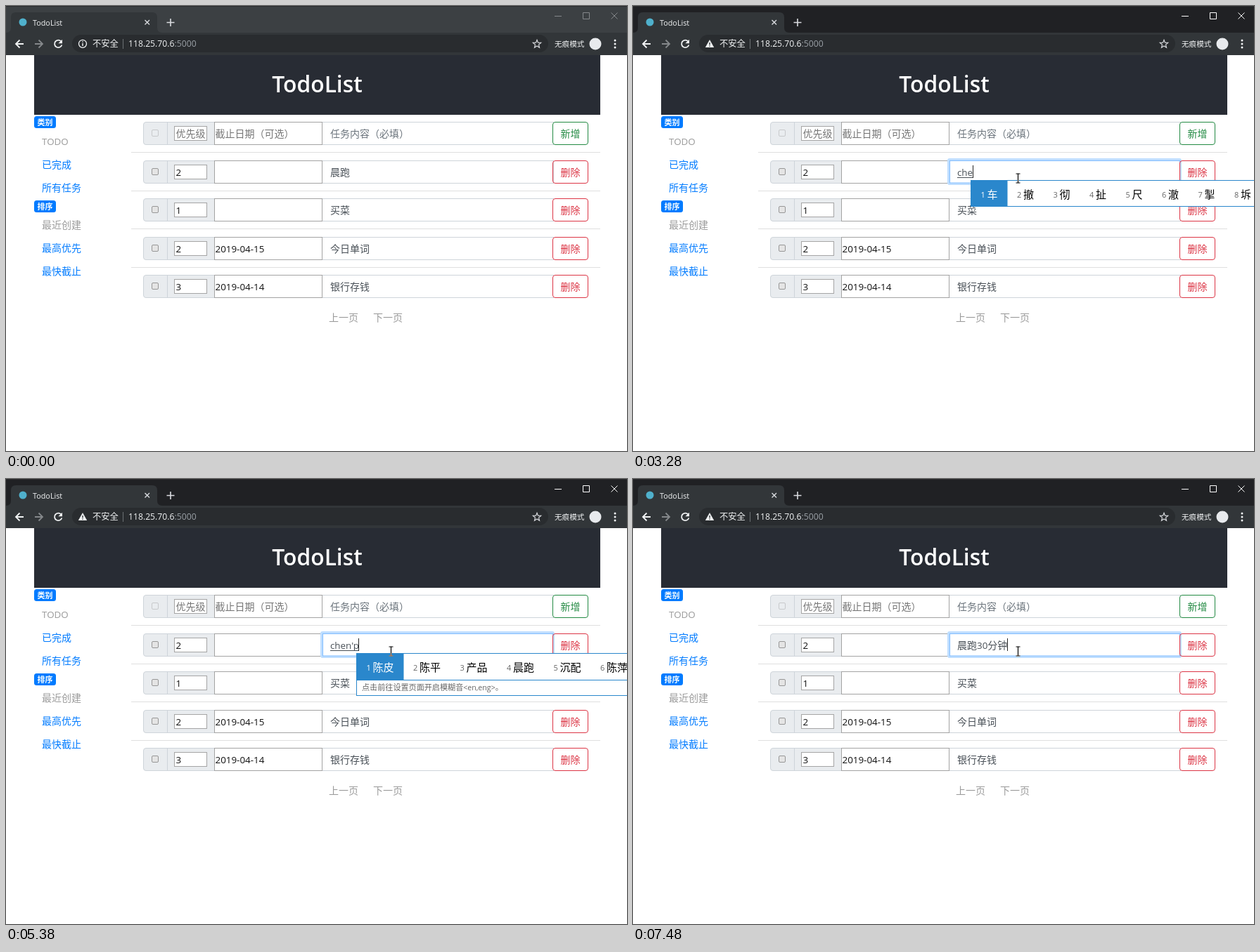
Animation of 883 by 634 pixels, one loop 8 s. Source, as an HTML page:

```html
<!DOCTYPE html>
<html lang="zh-CN">
<head>
<meta charset="utf-8">
<title>TodoList</title>
<style>
html, body { margin: 0; width: 100%; height: 100%; overflow: hidden; background: #fff; }
svg { display: block; width: 883px; height: 634px; isolation: isolate; }
text { font-family: "Open Sans", "Noto Sans CJK SC", "Noto Sans CJK", sans-serif; white-space: pre; }
#beam { mix-blend-mode: difference; }
</style>
</head>
<body>
<svg id="stage" viewBox="0 0 883 634"></svg>
<script>
const LOOP = 8000, CLICK = 780, WARN = 1940;
const BLUE = '#007bff', RED = '#dc3545', GREEN = '#238a43', MUTED = '#9b9b9b';
const IME_BLUE = '#2a87cc', INPUT_X = 461, INPUT_Y = 241.5;

const esc = s => s.replace(/&/g, '&amp;').replace(/</g, '&lt;').replace(/>/g, '&gt;');
// Latin runs are set slightly smaller than the Chinese text around them
const runs = (s, size) => s.replace(/[!-~]+/g,
  m => `<tspan font-size="${size * 0.957}">${esc(m)}</tspan>`);
const text = (x, y, s, fill, size = 14, more = '') =>
  `<text x="${x}" y="${y}" font-size="${size}" fill="${fill}" ${more}>${runs(s, size)}</text>`;
const rect = (x, y, w, h, fill, more = '') =>
  `<rect x="${x}" y="${y}" width="${w}" height="${h}" fill="${fill}" ${more}/>`;
const box = (x, y, w, h, stroke, fill = '#fff', rx = 0) =>
  rect(x + .5, y + .5, w - 1, h - 1, fill, `stroke="${stroke}" rx="${rx}"`);
const path = (d, stroke, width = 1, more = 'fill="none"') =>
  `<path d="${d}" stroke="${stroke}" stroke-width="${width}" ${more}/>`;
const dot = (x, y, r, fill, more = '') => `<circle cx="${x}" cy="${y}" r="${r}" fill="${fill}" ${more}/>`;

function browser() {
  const star = Array.from({ length: 10 }, (_, i) => {
    const r = i % 2 ? 2.6 : 6, a = i * Math.PI / 5;
    return (755 + r * Math.sin(a)).toFixed(1) + ' ' + (54.3 - r * Math.cos(a)).toFixed(1);
  }).join('L');
  return rect(0, 0, 883, 70, '#3c4043', 'id="frame"')
    + rect(0, 0, 883, 1, '#2a2b2d')
    + '<path d="M0 38Q7 38 7 31V16Q7 9 14 9H208Q215 9 215 16V31Q215 38 222 38H883V70H0Z" fill="#323639"/>'
    + dot(24, 23, 5.5, '#4fb0cc')
    + text(38, 27.5, 'TodoList', '#f1f3f4', 11.3)
    + path('M197.5 20l6.5 6.5m0-6.5l-6.5 6.5', '#dadce0', 1.4)
    + path('M228.5 23.5h11m-5.5-5.5v11', '#dadce0', 1.6)
    + '<g id="controls" fill="none" stroke="#85888b">'
    + '<path d="M780 14.5h10M820.5 9.5h9v9h-9zM860.5 9.5l9 9m0-9l-9 9"/></g>'
    + path('M25 54H14m5.5-5.5L14 54l5.5 5.5', '#f1f3f4', 1.8)
    + path('M41 54h11m-5.5-5.5L52 54l-5.5 5.5', '#85888b', 1.8)
    + path('M78.3 50.3A5.3 5.3 0 1 0 79.4 55.5', '#f1f3f4', 1.8)
    + '<path d="M80 47.7v5.6h-5.6z" fill="#f1f3f4"/>'
    + rect(94, 41, 677, 25, '#292c2f', 'rx="12.5"')
    + '<g id="info">' + dot(109, 53.8, 5.5, 'none', 'stroke="#f1f3f4" stroke-width="1.3"')
    + path('M109 53v4M109 50.2v1.5', '#f1f3f4', 1.4) + '</g>'
    + '<g id="warn"><path d="M109 48L115.2 59H102.8Z" fill="#f1f3f4"/>'
    + path('M109 52v3.4M109 56.4v1.4', '#292c2f', 1.3) + '</g>'
    + text(123, 58, '不安全', '#f1f3f4', 12.3)
    + path('M166.5 47v14', '#6b6f73')
    + `<text x="174" y="58" font-size="12.2" fill="#f1f3f4">118.25.70.6<tspan fill="#9aa0a6">:5000</tspan></text>`
    + path('M' + star + 'Z', '#dadce0', 1.2)
    + text(780, 58, '无痕模式', '#f1f3f4', 10.6)
    + dot(838, 54, 8.5, '#e8eaed')
    + [49, 54, 59].map(y => dot(866, y, 1.5, '#f1f3f4')).join('');
}

function sidebar() {
  const badge = (y, s) => rect(40, y, 31, 17, BLUE, 'rx="3.5"')
    + text(55.5, y + 12.8, s, '#fff', 11, 'text-anchor="middle" font-weight="700"');
  const link = (y, s, fill = BLUE) => text(51, y, s, fill);
  return badge(157, '类别') + link(197.5, 'TODO', MUTED) + link(230.5, '已完成') + link(263.5, '所有任务')
    + badge(277, '排序') + link(317, '最近创建', MUTED) + link(350, '最高优先') + link(383, '最快截止');
}

const TASKS = [
  ['优先级', '截止日期（可选）', '任务内容（必填）'],
  ['2', '', ''],
  ['1', '', '买菜'],
  ['2', '2019-04-15', '今日单词'],
  ['3', '2019-04-14', '银行存钱']
];

function row([level, date, task], i) {
  const y = Math.round(165.3 + 54.5 * i), base = y + 21.5, first = !i;
  const ink = first ? '#757575' : '#111', tone = first ? GREEN : RED;
  return box(195, y, 110, 33, '#ced4da', '#e9ecef', 3.5)
    + path(`M229.5 ${y + 1}v31`, '#ced4da')
    + box(207, y + 11, 10, 10, first ? '#c8cacc' : '#979797', first ? '#e9ecef' : '#e4e4e4', 1.5)
    + box(239, y + 6, 47, 21, '#a5a5a5')
    + text(241.5, base, level, ink)
    + box(449, y, 330, 33, '#ced4da')
    + box(296, y, 154, 33, '#a3a3a3')
    + text(297.5, base, date, ink)
    + text(INPUT_X, base, task, first ? '#6c757d' : '#495057')
    + (i === 1 ? '<g id="focus" fill="none">'
      + rect(448.5, 218.5, 330, 35, 'none', 'stroke="#bfdeff" stroke-width="3" rx="1.5"')
      + rect(450.5, 220.5, 327, 31.5, '#fff', 'stroke="#80bdff"') + '</g>' : '')
    + rect(777.5, y + .5, 50, 32, i === 1 ? 'none' : '#fff', `stroke="${tone}" rx="3.5"`)
    + text(802.5, base, first ? '新增' : '删除', tone, 14, 'text-anchor="middle"')
    + (i < 4 ? path(`M178 ${y + 43.5}h667`, '#dfdfdf') : '');
}

const stage = document.getElementById('stage');
stage.innerHTML = rect(0, 0, 883, 634, '#fff') + browser()
  + rect(40, 70, 805, 85, '#282c34')
  + text(442.5, 122.5, 'TodoList', '#fff', 33.2, 'text-anchor="middle" font-weight="600"')
  + sidebar() + TASKS.map(row).join('')
  + text(459, 448.5, '上一页', MUTED) + text(522, 448.5, '下一页', MUTED)
  + text(INPUT_X, INPUT_Y, '', '#495057', 14, 'id="entry"')
  + '<path id="under" stroke="#495057"/><path id="caret" stroke="#222"/><g id="ime"></g>'
  + '<path id="arrow" d="M0 0V16L3.8 12.5 6.3 18.2 8.8 17.1 6.3 11.6H11.4Z" fill="#fff" stroke="#000"/>'
  + '<path id="beam" d="M-3 -6.5h2.5l.5.5.5-.5H3M0 -6V6M-3 6.5h2.5l.5-.5.5.5H3" fill="none" stroke="#fff" stroke-width="1.2"/>';

const el = {};
for (const id of ['frame', 'controls', 'info', 'warn', 'focus', 'entry', 'under', 'caret', 'ime', 'arrow', 'beam'])
  el[id] = document.getElementById(id);

const WORDS = {
  c: '才 从 次 成 错 此 曾 菜 草',
  ch: '吃 出 车 成 长 场 处 产 城',
  che: '车 撤 彻 扯 尺 澈 掣 坼 砗',
  chen: '陈 沉 趁 晨 臣 尘 衬 称 辰',
  cheng: '成 称 城 程 乘 承 盛 撑 诚',
  "cheng'p": '成品 承平 成片 诚聘 诚品 成批',
  "cheng'pa": '成怕 城怕 成爬 成排 成派 城拍',
  "cheng'pao": '成跑 城跑 乘跑 成炮 成 称 城',
  "chen'p": '陈皮 陈平 产品 晨跑 沉配 陈萍',
  "chen'pa": '沉怕 陈怕 晨跑 尘排 陈派 陈攀',
  "chen'pao": '晨跑 陈跑 沉炮 陈 沉 趁 晨',
  f: '发 放 飞 非 分 份 服 房 方',
  fe: '非 飞 费 废 肥 分 份 风 封',
  fen: '分 份 粉 奋 纷 坟 愤 芬 焚',
  "fen'z": '分钟 分子 份子 分组 分值 分支',
  "fen'zh": '分钟 分之 分治 分支 分至 分众',
  "fen'zho": '分钟 分钟后 分众 分周 分钟内',
  "fen'zhon": '分钟 分众 分中 分钟后 分重',
  "fen'zhong": '分钟 分钟后 分众 分钟内 分种'
};

// time, committed text, caret, composition, candidates shown, hint shown
const STEPS = [
  [0, '晨跑', 0], [CLICK, '晨跑', 1], [1320, '晨跑', 0], [1850, '晨跑', 1],
  [1940, '晨跑，', 1], [2490, '晨跑，', 0], [2570, '晨跑', 0], [2720, '晨', 0], [2790, '', 0],
  [3030, '', 1, 'c', 0], [3110, '', 1, 'c', 1], [3190, '', 1, 'ch', 1], [3270, '', 1, 'che', 1],
  [3340, '', 1, 'chen', 1, 1], [3420, '', 1, 'cheng', 1], [3500, '', 1, 'cheng', 1, 1],
  [3580, '', 1, "cheng'p", 1, 1], [3740, '', 1, "cheng'pa", 1, 1], [3820, '', 1, "cheng'pao", 1, 1],
  [3900, '成跑', 1], [4450, '成跑', 0], [4520, '成', 0], [4690, '', 0],
  [4840, '', 1, 'c', 1], [4920, '', 1, 'ch', 1], [5000, '', 1, 'che', 1],
  [5070, '', 1, 'chen', 1], [5150, '', 1, 'chen', 1, 1],
  [5380, '', 1, "chen'p", 1, 1], [5540, '', 1, "chen'pa", 1, 1],
  [5620, '', 1, "chen'pao", 1], [5690, '', 1, "chen'pao", 1, 1],
  [6160, '晨跑', 1], [6380, '晨跑3', 1], [6460, '晨跑30', 1],
  [6700, '晨跑30', 1, 'f', 1], [6780, '晨跑30', 1, 'fe', 1], [6860, '晨跑30', 1, 'fen', 1, 1],
  [6950, '晨跑30', 1, "fen'z", 1], [7030, '晨跑30', 1, "fen'zh", 1], [7110, '晨跑30', 1, "fen'zho", 1],
  [7250, '晨跑30', 1, "fen'zhon", 1], [7340, '晨跑30', 1, "fen'zhong", 1],
  [7480, '晨跑30分钟', 1]
];

function candidates(left, comp, hint) {
  let x = left, list = '', firstWidth = 0;
  WORDS[comp].split(' ').forEach((word, i) => {
    const w = 36.5 + 15 * word.length;
    if (!i) firstWidth = w + 1;
    list += text(x + 14.5, 273, String(i + 1), i ? '#666' : '#fff', 11.5)
      + text(x + 23.5, 273.5, word, i ? '#000' : '#fff', 15);
    x += w;
  });
  return box(left, 248, Math.max(x - left + 40, 440), hint ? 61 : 38, IME_BLUE)
    + rect(left, 248, firstWidth, 38, IME_BLUE)
    + (hint ? path(`M${left} 286.5H883`, IME_BLUE)
      + text(left + 8, 301, '点击前往设置页面开启模糊音<en,eng>。', '#666', 11.1) : '')
    + list;
}

function setEntry(s) {
  el.entry.innerHTML = runs(s, 14);
  return s ? INPUT_X + el.entry.getComputedTextLength() : INPUT_X;
}

function showStep([, done, caret, comp = '', list, hint]) {
  const start = setEntry(done), end = setEntry(done + comp);
  const cx = Math.floor(end) + .5;
  el.under.setAttribute('d', comp ? `M${start} 244.5H${end}` : '');
  el.caret.setAttribute('d', caret ? `M${cx} 227v18` : '');
  el.ime.innerHTML = list ? candidates(Math.floor(end) - 3, comp, hint) : '';
}

const show = (node, on) => node.setAttribute('visibility', on ? 'visible' : 'hidden');
const clamp = v => Math.min(1, Math.max(0, v));
const ease = p => p * p * (3 - 2 * p);
let shown = null;

function draw(t) {
  const step = STEPS.filter(s => s[0] <= t).pop();
  if (step !== shown) showStep(shown = step);

  const active = t >= CLICK;
  el.frame.setAttribute('fill', active ? '#202124' : '#3c4043');
  el.controls.setAttribute('stroke', active ? '#fff' : '#85888b');
  el.focus.setAttribute('opacity', ease(clamp((t - CLICK) / 140)));
  show(el.info, t < WARN);
  show(el.warn, t >= WARN);

  const p = ease(clamp((t - 70) / 630));
  const x = 868 - 321 * p, y = 613 - 367.5 * p;
  const inField = x < 777 && y < 252;
  el.arrow.setAttribute('transform', `translate(${x} ${y})`);
  el.beam.setAttribute('transform', `translate(${x + .5} ${y})`);
  show(el.arrow, t >= 70 && !inField);
  show(el.beam, inField);
}

function tick() {
  draw(performance.now() % LOOP);
  requestAnimationFrame(tick);
}
tick();
</script>
</body>
</html>
```
